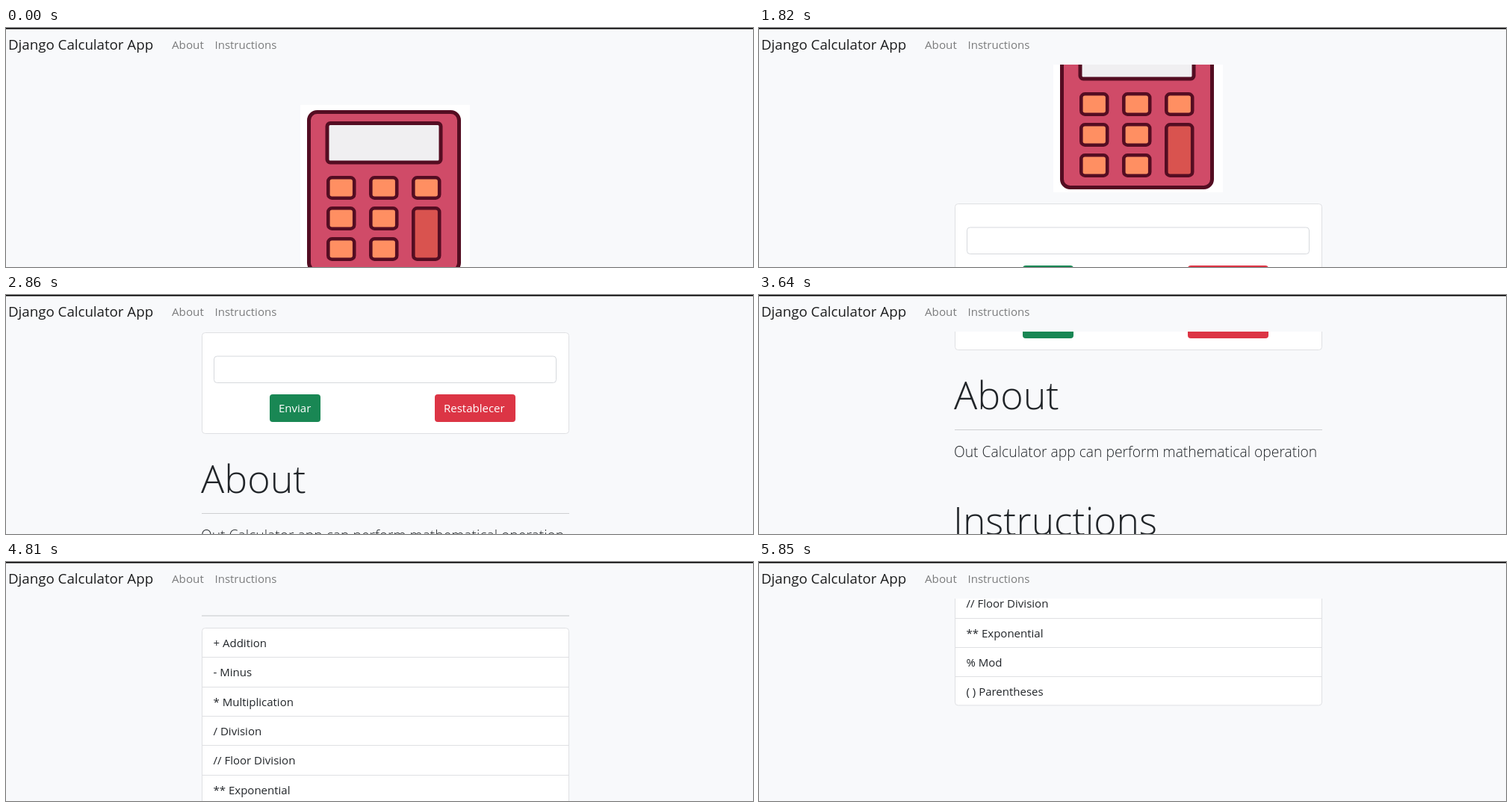
These frames come from a looping animation (1000 px wide and 320 px high, 6.63 s). An HTML page with a canvas:

```html
<!DOCTYPE html>
<html lang="en">
<head>
<meta charset="utf-8">
<title>Calculator page scroll</title>
<style>
  html, body { margin: 0; width: 100%; height: 100%; overflow: hidden; background: #f8f9fb; }
  canvas { display: block; width: 1000px; height: 320px; }
</style>
</head>
<body>
<canvas id="stage"></canvas>
<script>
const W = 1000, H = 320, LOOP = 6630, STEP = 130;
const NAV_BOTTOM = 49, LEFT = 262, RIGHT = 754;
const PAGE = '#f8f9fb', INK = '#212529', BORDER = '#dfe0e3', DARK = '#540d22';
const FONT = '"Open Sans", "Noto Sans", sans-serif';

// Each burst: start time, then one scroll position per step.
const BURSTS = [
  [1300, 38, 74],
  [1820, 112, 148],
  [2210, 186, 222, 223],
  [2730, 260, 297],
  [3250, 334, 371],
  [3640, 409, 445, 483, 519, 553, 570],
  [4550, 608, 646, 685, 723, 761, 799, 837, 866, 882, 892, 895]
];

const ROWS = ['+ Addition', '- Minus', '* Multiplication', '/ Division',
  '// Floor Division', '** Exponential', '% Mod', '( ) Parentheses'];
const LIST_TOP = 773, ROW_H = 39.3;

const canvas = document.getElementById('stage');
const ctx = canvas.getContext('2d');
const dpr = window.devicePixelRatio || 1;
canvas.width = W * dpr;
canvas.height = H * dpr;

function scrollAt(t) {
  let pos = 0;
  for (const [start, ...stops] of BURSTS) {
    if (t < start) break;
    const i = Math.floor((t - start) / STEP);
    pos = stops[Math.min(i, stops.length - 1)];
  }
  return pos;
}

function text(str, x, y, size, color = INK, weight = 400) {
  ctx.font = `${weight} ${size}px ${FONT}`;
  ctx.fillStyle = color;
  ctx.fillText(str, x, y);
}

// Rounded box given by its outer edges; the line lies inside them.
function box(x1, y1, x2, y2, r, fill, stroke, line = 1) {
  const inset = stroke ? line / 2 : 0;
  ctx.beginPath();
  ctx.roundRect(x1 + inset, y1 + inset, x2 - x1 - 2 * inset, y2 - y1 - 2 * inset, r);
  ctx.fillStyle = fill;
  ctx.fill();
  if (stroke) {
    ctx.strokeStyle = stroke;
    ctx.lineWidth = line;
    ctx.stroke();
  }
}

function rule(y, color) {
  ctx.fillStyle = color;
  ctx.fillRect(LEFT, y, RIGHT - LEFT, 1);
}

function calculator() {
  ctx.fillStyle = '#fff';
  ctx.fillRect(394, 103, 227, 229);
  box(403, 110, 609, 328, 11, '#d04b68', DARK, 5);
  box(427.5, 125, 584.5, 182.5, 4, '#f0eff1', DARK, 5);
  for (let row = 0; row < 3; row++) {
    for (let col = 0; col < 3; col++) {
      if (col === 2 && row > 0) continue;
      const x = 429 + col * 57, y = 198 + row * 41;
      box(x, y, x + 39.5, y + 32, 5, '#ff8f62', DARK, 4.6);
    }
  }
  box(543, 239, 582.5, 312, 5, '#d9534f', DARK, 4.6);
}

function form() {
  box(LEFT, 347, RIGHT, 483, 4, '#fff', BORDER);
  box(278, 378.5, 737, 415, 4, '#fff', '#d6d9dd');
  box(353, 430, 421, 467, 4, '#198754');
  box(574, 430, 682, 467, 4, '#dc3545');
  text('Enviar', 365, 454, 15, '#fff');
  text('Restablecer', 586, 454, 15, '#fff');
}

function sections() {
  text('About', 261, 562, 52, INK, 300);
  rule(589, '#cfd0d2');
  text('Out Calculator app can perform mathematical operation', 261, 626, 19.3, INK, 300);
  text('Instructions', 260, 730, 51.5, INK, 300);
  rule(756.5, '#c6c7c9');
}

function list() {
  box(LEFT, LIST_TOP, RIGHT, LIST_TOP + ROWS.length * ROW_H, 4, '#fff', BORDER);
  ROWS.forEach((label, i) => {
    const y = LIST_TOP + i * ROW_H;
    if (i) rule(Math.round(y), BORDER);
    text(label, 277.5, Math.round(y + 26), 15);
  });
}

function navbar() {
  text('Django Calculator App', 3, 28.5, 18.7, '#1b1c1d');
  text('About', 222, 27.5, 15.2, '#7b7c7d');
  text('Instructions', 279.5, 27.5, 15, '#7b7c7d');
  ctx.fillStyle = '#000';
  ctx.fillRect(0, 0, W, 1.5);
}

function draw(t) {
  ctx.setTransform(dpr, 0, 0, dpr, 0, 0);
  ctx.fillStyle = PAGE;
  ctx.fillRect(0, 0, W, H);
  ctx.save();
  ctx.beginPath();
  ctx.rect(0, NAV_BOTTOM, W, H - NAV_BOTTOM);
  ctx.clip();
  ctx.translate(0, -scrollAt(t));
  calculator();
  form();
  sections();
  list();
  ctx.restore();
  navbar();
}

const begin = performance.now();
function tick() {
  draw((performance.now() - begin) % LOOP);
  requestAnimationFrame(tick);
}
tick();
</script>
</body>
</html>
```
